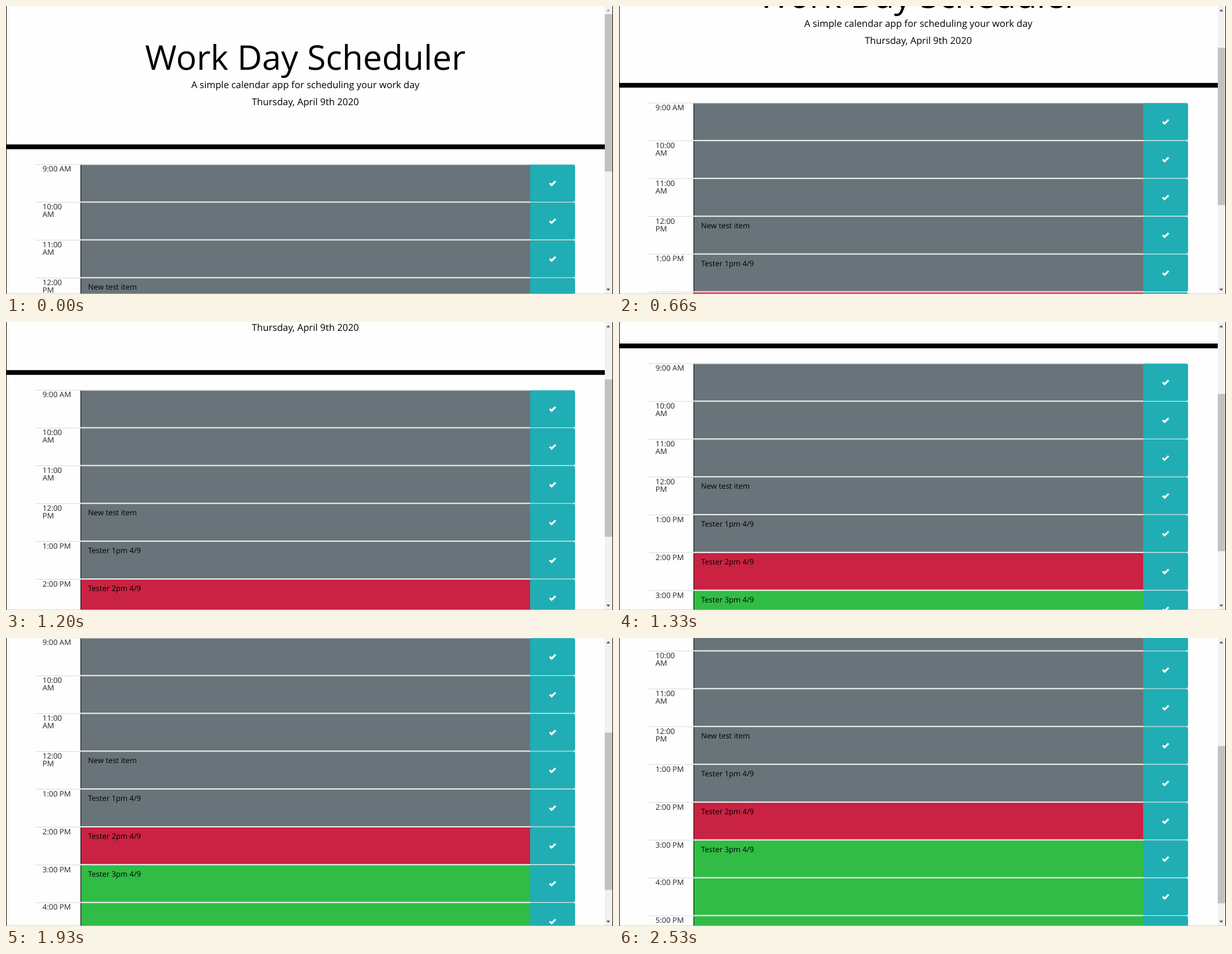
An HTML page for the animation above (2.6 s loop, 960 px wide and 456 px high).

```html
<!DOCTYPE html>
<html lang="en">
<head>
<meta charset="utf-8">
<title>Work Day Scheduler</title>
<style>
  @property --y { syntax: '<number>'; inherits: true; initial-value: 0; }
  html, body { margin: 0; width: 960px; height: 456px; overflow: hidden; background: #fdfefd; }
  svg {
    display: block;
    font-family: 'Open Sans', sans-serif;
    text-rendering: geometricPrecision;
    animation: scroll 2600ms step-end infinite;
  }
  .page { transform: translateY(calc(var(--y) * -1px)); }
  .thumb { fill: #c1c1c1; transform: translateY(calc(var(--y) * .545px)); }
  .up { animation: arrow 2600ms step-end infinite; }
  .title { font-size: 53.9px; text-anchor: middle; }
  .lead { font-size: 14.97px; text-anchor: middle; }
  .row { font-size: 11.97px; }
  .hour { fill: #212529; }
  .past { fill: #69747a; }
  .present { fill: #ca2242; }
  .future { fill: #31bc46; }
  .save { fill: #20aeb4; }
  .check { fill: none; stroke: #fff; stroke-width: 2.9; }

  @keyframes scroll {
    0% { --y: 0; }
    2.3% { --y: 1; }
    4.99% { --y: 7; }
    9.99% { --y: 28; }
    12.69% { --y: 45; }
    17.69% { --y: 74; }
    23.07% { --y: 94; }
    25.38% { --y: 97.4; }
    33.07% { --y: 98; }
    35.76% { --y: 99; }
    40.76% { --y: 102; }
    46.15% { --y: 143; }
    48.45% { --y: 164; }
    51.15% { --y: 185.1; }
    56.15% { --y: 191; }
    61.53% { --y: 192.5; }
    63.84% { --y: 193.5; }
    69.22% { --y: 218; }
    74.22% { --y: 251; }
    84.61% { --y: 275; }
    86.92% { --y: 281; }
    92.3% { --y: 287; }
    97.3% { --y: 290.1; }
  }
  @keyframes arrow {
    0% { fill: #a3a3a3; }
    2.3%, 100% { fill: #505050; }
  }
</style>
</head>
<body>
<svg width="960" height="456" viewBox="0 0 960 456">
  <g class="page">
    <text class="title" x="473.4" y="100.7">Work Day Scheduler</text>
    <text class="lead" x="473.4" y="130">A simple calendar app for scheduling your work day</text>
    <text class="lead" x="473.4" y="157">Thursday, April 9th 2020</text>
    <rect y="219.2" width="947" height="7.5"/>
    <g id="rows"></g>
  </g>
  <rect x="947" width="12" height="456" fill="#f1f1f1"/>
  <rect class="thumb" x="947" y="13" width="12" height="249"/>
  <path class="up" d="M949.5 8.5h6l-3-3.5z"/>
  <path fill="#505050" d="M949.5 447.5h6l-3 3.5z"/>
  <rect y="455" width="960" height="1" fill="#c4c4c4" opacity=".6"/>
  <rect width="1" height="456" fill="#222"/>
  <rect x="959" width="1" height="456" fill="#222"/>
</svg>
<script>
  const TOP = 251.2, PITCH = 59.87, NOW = 14;
  const notes = { 12: 'New test item', 13: 'Tester 1pm 4/9', 14: 'Tester 2pm 4/9', 15: 'Tester 3pm 4/9' };

  function hourLabel(hour) {
    const clock = `${hour % 12 || 12}:00`, half = hour < 12 ? 'AM' : 'PM';
    // Two-digit hours wrap onto a second line
    return clock.length > 4
      ? `${clock}<tspan x="57.8" dy="12">${half}</tspan>`
      : `${clock} ${half}`;
  }

  function row(hour) {
    const y = TOP + (hour - 9) * PITCH;
    const state = hour < NOW ? 'past' : hour > NOW ? 'future' : 'present';
    return `<g class="row" transform="translate(0 ${y.toFixed(2)})">
      <rect x="46.5" y="-.8" width="853" height="1.2" fill="#dfe2e2"/>
      <text class="hour" x="57.8" y="11.2">${hourLabel(hour)}</text>
      <rect class="${state}" x="118" y=".4" width="711" height="57.9"/>
      <rect x="117.8" y=".4" width="1" height="57.9"/>
      <text x="129.8" y="18.5">${notes[hour] || ''}</text>
      <path class="save" d="M829 0h68q3 0 3 3v52.8q0 3 -3 3h-68z"/>
      <path class="check" d="M859.9 29.4l3 3 6.2 -6.2"/>
    </g>`;
  }

  document.getElementById('rows').innerHTML =
    Array.from({ length: 9 }, (_, i) => row(9 + i)).join('');
</script>
</body>
</html>
```
